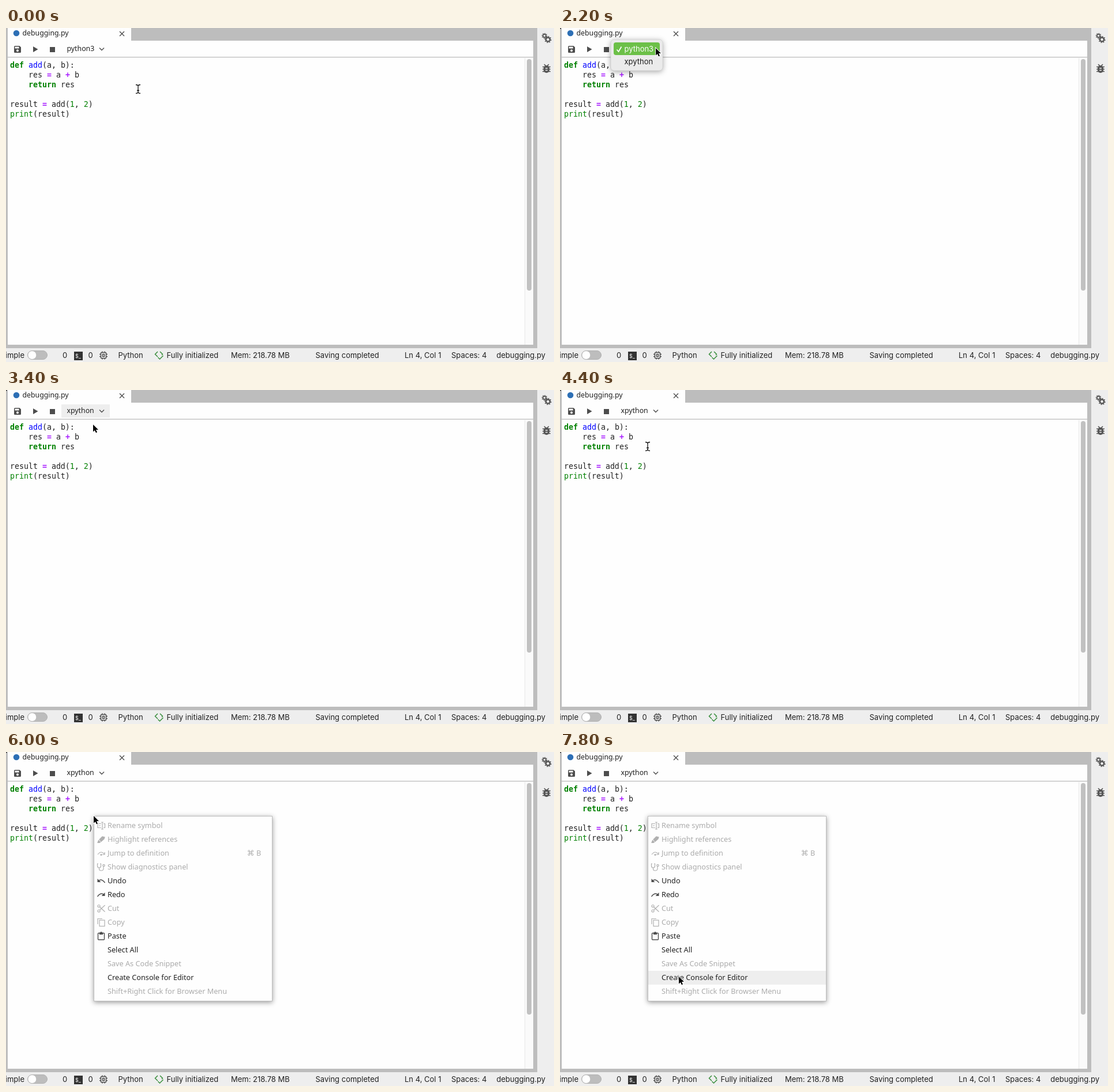
Recreate the animation shown at these times as an HTML page. Size 950x580 px, loop 8000 ms.

```html
<!DOCTYPE html>
<html lang="en">
<head>
<meta charset="utf-8">
<title>Code editor</title>
<style>
html, body { margin: 0; width: 100%; height: 100%; overflow: hidden; background: #fefefe; }
svg { display: block; width: 950px; height: 580px; }
text { white-space: pre; }

.ui { font: 12.3px "Noto Sans", sans-serif; fill: #212121; }
.status { font: 13px Inter, sans-serif; fill: #212121; }
.popup text { font: 13px Inter, sans-serif; }
.code { font: 13.28px "DejaVu Sans Mono", monospace; fill: #212121; }
.keyword { fill: #008000; font-weight: bold; }
.operator { fill: #aa22ff; font-weight: bold; }
.name { fill: #0000ff; }
.builtin { fill: #008000; }

.menu { font: 12.7px "Noto Sans", "DejaVu Sans", sans-serif; fill: #212121; }
.menu .off { fill: #ababab; }
.line { fill: none; stroke: #4d4d4d; stroke-width: 1.4; }
.pale { fill: none; stroke: #b0b0b0; stroke-width: 1.2; }
.shadow { filter: drop-shadow(0 2px 4px #0006); }
.soft { filter: drop-shadow(0 2px 5px #0005); }

/* Everything switches hard on a 200 ms grid: 2.5% of the loop. */
.anim { animation: 8s step-end infinite; }
.pointer { animation-name: travel; }
.beam { animation-name: beam; }
.arrow { animation-name: arrow; }
.caret { animation-name: caret; }
.hover { animation-name: hover; }
.popup { animation-name: popup; }
.pick { animation-name: pick; }
.first { animation-name: first; }
.second { animation-name: second; }
.before { animation-name: before; }
.after { animation-name: after; }
.menu { animation-name: menu; }
.row { animation-name: row; }
.corner { animation-name: corner; }

@keyframes travel {
  0% { transform: translate(229px, 106px); }
  5% { transform: translate(227px, 103px); }
  7.5% { transform: translate(216px, 92px); }
  10% { transform: translate(202px, 74px); }
  12.5% { transform: translate(184px, 50px); }
  15% { transform: translate(170px, 38px); }
  17.5% { transform: translate(166px, 35px); }
  30% { transform: translate(165px, 37px); }
  32.5% { transform: translate(160px, 44px); }
  35% { transform: translate(154px, 56px); }
  37.5% { transform: translate(151px, 60px); }
  50% { transform: translate(152px, 76px); }
  52.5% { transform: translate(152px, 92px); }
  55% { transform: translate(152px, 98px); }
  62.5% { transform: translate(152px, 105px); }
  65%, 75% { transform: translate(152px, 111px); }
  77.5% { transform: translate(155px, 125px); }
  80% { transform: translate(163px, 170px); }
  82.5% { transform: translate(175px, 228px); }
  85% { transform: translate(186px, 290px); }
  87.5% { transform: translate(192px, 325px); }
  90% { transform: translate(196px, 348px); }
  92.5% { transform: translate(200px, 368px); }
  95% { transform: translate(204px, 384px); }
  97.5%, 100% { transform: translate(206px, 390px); }
}
@keyframes beam { 0%, 50% { opacity: 1; } 12.5%, 75%, 100% { opacity: 0; } }
@keyframes arrow { 0%, 50% { opacity: 0; } 12.5%, 75%, 100% { opacity: 1; } }
@keyframes caret { 0%, 12.5%, 25%, 75%, 100% { opacity: 0; } 5%, 20%, 67.5% { opacity: 1; } }
@keyframes hover { 0%, 25%, 50%, 100% { opacity: 0; } 15%, 40% { opacity: 1; } }
@keyframes popup { 0%, 42.5%, 100% { opacity: 0; } 25% { opacity: 1; } 40% { opacity: .5; } }
@keyframes pick { 0% { transform: translateY(-22px); } 35%, 100% { transform: none; } }
@keyframes first { 0% { fill: #fff; stroke: #fff; } 35%, 100% { fill: #1c1c1c; stroke: #1c1c1c; } }
@keyframes second { 0% { fill: #1c1c1c; } 35%, 100% { fill: #fff; } }
@keyframes before { 0% { opacity: 1; } 40%, 100% { opacity: 0; } }
@keyframes after { 0% { opacity: 0; } 40%, 100% { opacity: 1; } }
@keyframes menu { 0% { opacity: 0; } 75%, 100% { opacity: 1; } }
@keyframes row {
  0%, 85%, 92.5% { opacity: 0; transform: none; }
  82.5% { opacity: 1; transform: translateY(96px); }
  87.5% { opacity: 1; transform: translateY(192px); }
  90% { opacity: 1; transform: translateY(216px); }
  95%, 100% { opacity: 1; transform: translateY(264px); }
}
@keyframes corner { 0% { opacity: 0; } 5%, 100% { opacity: 1; } }
</style>
</head>
<body>
<svg viewBox="0 0 950 580">
  <!-- Window frame -->
  <rect width="950" height="580" fill="#eee"/>
  <rect width="921" height="556" fill="#bdbdbd"/>
  <rect x="3" y="22" width="911" height="528" fill="#fefefe"/>
  <rect x="3" width="214" height="23" fill="#fefefe"/>
  <rect x="3" y="50" width="911" height="1.3" fill="#bdbdbd"/>
  <rect x="899" y="52" width="15" height="498" fill="#fafafa"/>
  <rect x="899" y="52" width="1" height="498" fill="#e8e8e8"/>
  <rect x="903" y="54" width="8" height="402" rx="4" fill="#c1c1c1"/>
  <path class="anim corner" d="M0 0H2L0 2Z"/>

  <!-- Tab and toolbar -->
  <circle cx="18" cy="9" r="5.3" fill="#2d6fb5"/>
  <text class="ui" x="28.5" y="13">debugging.py</text>
  <path class="line" d="M197 6l8 8m0-8l-8 8"/>
  <path fill="#4d4d4d" fill-rule="evenodd" d="M15.500 31H23.500L26 33.500V41.500Q26 43 24.500 43H15.500Q14 43 14 41.500V32.500Q14 31 15.500 31ZM15.500 32.500V35.500H22.500V32.500ZM20 37.300a2 2 0 1 0 .01 0Z"/>
  <path fill="#4d4d4d" d="M47 32L55.500 37L47 42ZM76 33h9v9h-9Z"/>
  <rect class="anim hover" x="96" y="25" width="84" height="23" fill="#eee"/>
  <g class="ui">
    <text class="anim before" x="105.500" y="40">python3</text>
    <text class="anim after" x="105.500" y="40">xpython</text>
  </g>
  <path class="line" d="M162 34.500l4 4l4-4"/>

  <!-- Code -->
  <g class="code">
    <text x="7" y="69"><tspan class="keyword">def</tspan> <tspan class="name">add</tspan>(a, b):</text>
    <text x="39" y="86">res <tspan class="operator">=</tspan> a <tspan class="operator">+</tspan> b</text>
    <text x="39" y="103"><tspan class="keyword">return</tspan> res</text>
    <text x="7" y="137">result <tspan class="operator">=</tspan> add(<tspan class="builtin">1</tspan>, <tspan class="builtin">2</tspan>)</text>
    <text x="7" y="154"><tspan class="builtin">print</tspan>(result)</text>
  </g>
  <rect class="anim caret" x="7" y="107" width="1.200" height="17"/>

  <!-- Right sidebar -->
  <g fill="none" stroke="#555">
    <circle cx="933.500" cy="13.500" r="2.600" stroke-width="1.600"/>
    <circle cx="933.500" cy="13.500" r="4.100" stroke-width="1.500" pathLength="16" stroke-dasharray="1"/>
    <circle cx="939.500" cy="20" r="3.500" stroke-width="2.400"/>
    <circle cx="939.500" cy="20" r="5.300" stroke-width="1.600" pathLength="16" stroke-dasharray="1"/>
    <rect x="932" y="65" width="10" height="13" rx="5" fill="#555" stroke="none"/>
    <path stroke-width="1.700" d="M930 67.500h14m-14 4h14m-14 4h14M933 63l3 3m5-3l-3 3"/>
    <path stroke="#eee" stroke-width="1.500" d="M935.200 70h3.600m-3.600 3.500h3.600"/>
  </g>

  <!-- Status bar -->
  <g class="status">
    <text x="32" y="573" text-anchor="end">Simple</text>
    <rect x="37.500" y="560.500" width="34" height="15" rx="7.500" fill="#bdbdbd" stroke="#b0b0b0"/>
    <circle cx="45.300" cy="568" r="7" fill="#fefefe"/>
    <text x="98" y="573">0</text>
    <rect x="118" y="562" width="15" height="15" fill="#333"/>
    <text x="120" y="573" style="font-size:9px;fill:#fff">$_</text>
    <text x="142.500" y="573">0</text>
    <g class="line">
      <rect x="164.500" y="563.500" width="9" height="10" rx="1"/>
      <rect x="167.500" y="566.500" width="3" height="4"/>
      <path d="M167 561.500v2m4-2v2m-4 10v2m4-2v2M162 566.500h2m-2 4h2m10-4h2m-2 4h2"/>
    </g>
    <text x="194.500" y="573">Python</text>
    <path fill="none" stroke="#388e3c" stroke-width="1.500" d="M263 562l-4.500 4.500l4.500 4.500M267 562l4.500 4.500l-1.500 1.500M263.500 572l3 3l6-6"/>
    <text x="278.500" y="573">Fully initialized</text>
    <text x="390" y="573">Mem: 218.78 MB</text>
    <text x="536.500" y="573">Saving completed</text>
    <text x="691" y="573">Ln 4, Col 1</text>
    <text x="772" y="573">Spaces: 4</text>
    <text x="935" y="573" text-anchor="end">debugging.py</text>
  </g>

  <!-- Kernel list -->
  <g class="anim popup">
    <rect class="soft" x="88" y="20" width="90" height="54" rx="6" fill="#ebebeb" stroke="#c9c9c9" stroke-width=".6"/>
    <rect class="anim pick" x="93" y="47" width="80" height="22" rx="4" fill="#6cc048"/>
    <g class="anim first">
      <path d="M98.500 37.500l3 3.500l5-8.500" style="fill:none" stroke-width="1.700"/>
      <text x="111.500" y="41" stroke="none">python3</text>
    </g>
    <text class="anim second" x="111.500" y="63">xpython</text>
  </g>

  <!-- Context menu -->
  <g class="anim menu">
    <rect class="shadow" x="152.500" y="111.500" width="309" height="321" fill="#fefefe" stroke="#bdbdbd"/>
    <rect class="anim row" x="153" y="116" width="308" height="24" fill="#eee"/>
    <g class="off">
      <text x="176" y="132">Rename symbol</text>
      <text x="176" y="156">Highlight references</text>
      <text x="176" y="180">Jump to definition</text>
      <text x="418" y="180">⌘</text>
      <text x="434" y="180">B</text>
      <text x="176" y="204">Show diagnostics panel</text>
      <text x="176" y="276">Cut</text>
      <text x="176" y="300">Copy</text>
      <text x="176" y="372">Save As Code Snippet</text>
      <text x="176" y="420">Shift+Right Click for Browser Menu</text>
    </g>
    <text x="176" y="228">Undo</text>
    <text x="176" y="252">Redo</text>
    <text x="176" y="324">Paste</text>
    <text x="176" y="348">Select All</text>
    <text x="176" y="396">Create Console for Editor</text>
    <g class="pale">
      <path d="M165 124.500h-6v7h6m4-7h2.500v7h-2.500M165 122h4m-2 0v12m-2 0h4M161 128h3"/>
      <path fill="#b0b0b0" d="M159 157.500l1.500-4l3 3l-1.500 1ZM162 152l5-5l4 1l-1 3l-5 4.500Z"/>
      <path d="M159 178q6-8 12 0m0-4v4h-4"/>
      <circle cx="165" cy="178.500" r="1" fill="#b0b0b0"/>
      <path d="M160 194h-1.500v4q0 3 3 3t3-3v-4h-1.500M161.500 201v2q0 3 3.500 3t4-3v-4"/>
      <circle cx="169.500" cy="197" r="1.700"/>
      <circle cx="161" cy="267.500" r="2"/>
      <circle cx="161" cy="276" r="2"/>
      <path d="M162.500 269l9 8.500M162.500 274.500l9-8.500"/>
      <path d="M159 299v-9.500h8"/>
      <rect x="162" y="292" width="9" height="10.500"/>
    </g>
    <g class="line">
      <path d="M160 224q6-5 11.500 3"/>
      <path d="M170 248q-6-5-11.500 3"/>
      <rect x="159.500" y="314.500" width="11" height="11.500" rx="1"/>
    </g>
    <path fill="#4d4d4d" d="M158.500 220v6h6ZM171.500 244v6h-6ZM162 313.500h1.500a1.500 1.500 0 0 1 3 0h1.500v3.500h-6Z"/>
  </g>

  <!-- Mouse pointer -->
  <g class="anim pointer">
    <g class="anim beam" fill="none">
      <path id="ibeam" stroke="#fff" stroke-width="2.600" d="M-4-7.500Q0-7.500 0-5Q0-7.500 4-7.500M0-5V5M-4 7.500Q0 7.500 0 5Q0 7.500 4 7.500M-2 2.500H2"/>
      <use href="#ibeam" style="stroke:#000"/>
      <path stroke="#111" stroke-width="1.300" d="M-4-7.500Q0-7.500 0-5Q0-7.500 4-7.500M0-5V5M-4 7.500Q0 7.500 0 5Q0 7.500 4 7.500M-2 2.500H2"/>
    </g>
    <path class="anim arrow" stroke="#fff" stroke-width="1.800" paint-order="stroke" d="M0 0V12.500L2.900 9.900L4.900 14.300L7 13.400L5 9.100H9Z"/>
  </g>
</svg>
</body>
</html>
```
